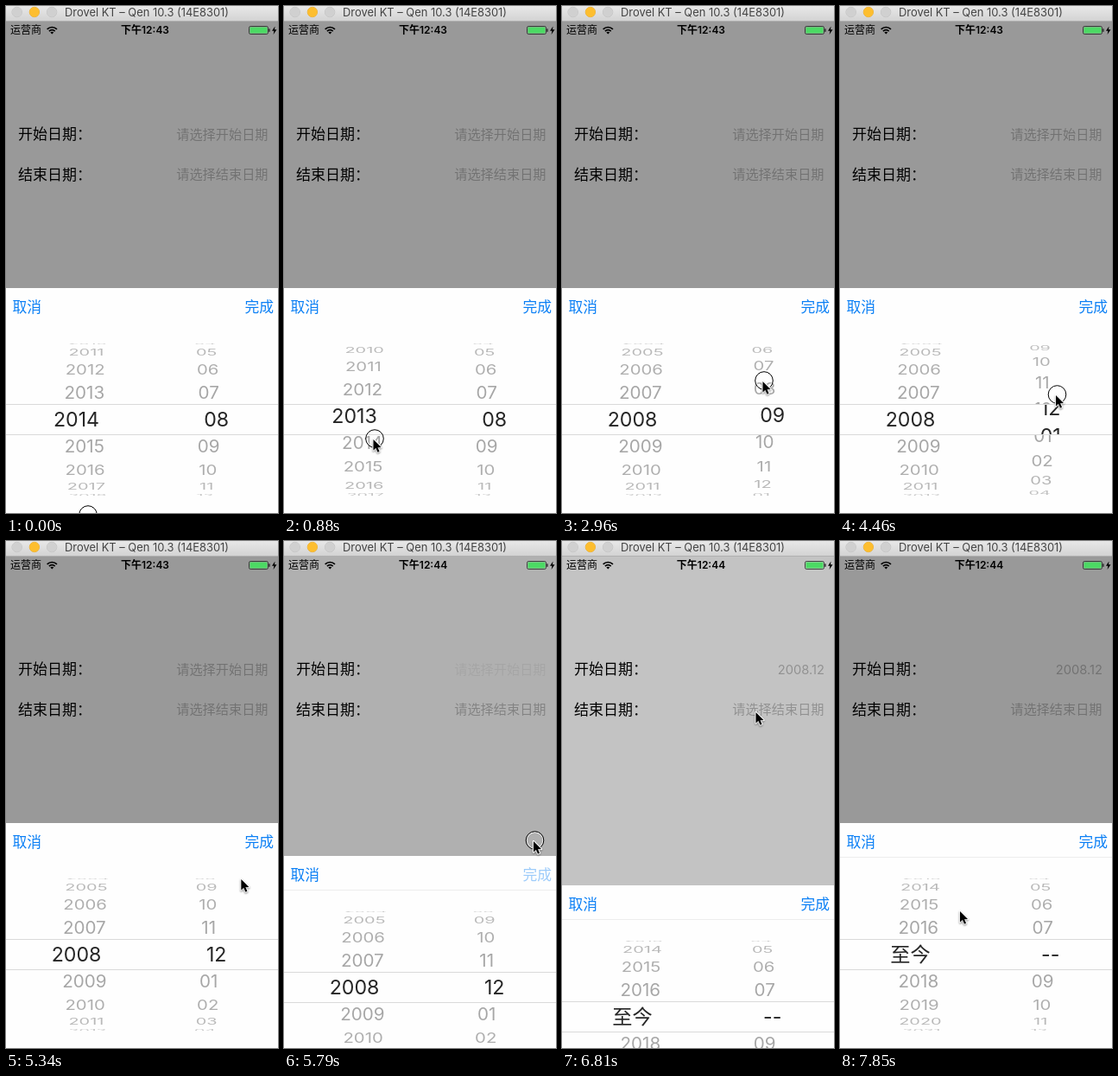
An HTML page with a canvas that plays this animation: 315x586 px, repeating every 8000 ms.

```html
<!DOCTYPE html>
<html lang="zh-CN">
<head>
<meta charset="utf-8">
<style>
html, body { margin: 0; width: 100%; height: 100%; overflow: hidden; background: #999; }
canvas { display: block; width: 315px; height: 586px; }
</style>
</head>
<body>
<canvas id="stage"></canvas>
<script>
const W = 315, H = 586, LOOP = 8000, STEP = 147.5;
const canvas = document.getElementById('stage');
const ctx = canvas.getContext('2d');
const dpr = window.devicePixelRatio || 1;
canvas.width = W * dpr;
canvas.height = H * dpr;

const FONT = "Inter, 'Noto Sans CJK SC', 'Noto Sans CJK', sans-serif";
const BLUE = '#0a7ff5', HINT = '#bebebe';
const SHEET_H = 260, CENTER = 152.2, RADIUS = 89, ROW_ANGLE = 0.355, ROW_DRAG = 35;
const CLOSE_AT = 5678, OPEN_AT = 6591, SLIDE = 300;

const drag = (wheel, x, from, to, start, end, release) => ({ wheel, x, from, to, start, end, release });
const hold = (x, y, start, release) => drag('', x, y, y, start, release, release);

// The pointer glides from each gesture to the next; drags turn a wheel.
const gestures = [
  hold(95, 588, 0, 140),
  drag('year', 105, 470, 575, 560, 1180, 1200),
  drag('year', 107, 427.5, 538, 1330, 1770, 2300),
  drag('month', 234, 474, 392, 2550, 3350, 3720),
  drag('month', 251.5, 533, 449, 4180, 4420, 4900),
  hold(290.5, 346, 5650, 5850),
  hold(226, 197, 6430, 6560),
  hold(226, 197, 7120, 7120),
  hold(140.5, 427, 7800, 7800)
];

const clamp = v => Math.min(1, Math.max(0, v));
const ease = p => (1 - Math.cos(Math.PI * clamp(p))) / 2;
const mix = (a, b, p) => a + (b - a) * p;
const dragY = (g, t) => mix(g.from, g.to, clamp((t - g.start) / (g.end - g.start || 1)));

function wheelPosition(wheel, pos, t) {
  for (const g of gestures) {
    if (g.wheel !== wheel || t < g.start) continue;
    pos += (g.from - dragY(g, t)) / ROW_DRAG;
    pos = mix(pos, Math.round(pos), ease((t - g.release) / 140));
  }
  return pos;
}

function pointerAt(t) {
  const index = gestures.filter(g => g.start <= t).length - 1;
  const now = gestures[index], next = gestures[index + 1] || now;
  const p = ease((t - now.release) / (next.start - now.release || 1));
  return {
    x: mix(now.x, next.x, p),
    y: t <= now.release ? dragY(now, t) : mix(now.to, next.from, p),
    pressed: t < now.release
  };
}

function rect(x, y, w, h, color) {
  ctx.fillStyle = color;
  ctx.fillRect(x, y, w, h);
}

function text(str, x, y, size, color = '#000', align = 'left', weight = 400) {
  ctx.font = `${weight} ${size}px ${FONT}`;
  ctx.textAlign = align;
  ctx.textBaseline = 'middle';
  ctx.fillStyle = color;
  ctx.fillText(str, x, y + 0.8);
}

function polygon(points, fill, outline = 0) {
  ctx.beginPath();
  points.forEach(([x, y]) => ctx.lineTo(x, y));
  ctx.closePath();
  ctx.fillStyle = ctx.strokeStyle = fill;
  ctx.lineJoin = 'round';
  ctx.lineWidth = outline;
  if (outline) ctx.stroke();
  ctx.fill();
}

function ring(x, y, r, color, width, from = 0, to = 2 * Math.PI) {
  ctx.beginPath();
  ctx.arc(x, y, r, from, to);
  ctx.strokeStyle = color;
  ctx.lineWidth = width;
  ctx.stroke();
}

function drawTitleBar() {
  const shade = ctx.createLinearGradient(0, 0, 0, 17);
  shade.addColorStop(0, '#e8e8e8');
  shade.addColorStop(1, '#d3d3d3');
  rect(0, 0, W, 17, shade);
  rect(0, 17, W, 1, '#b0b0b0');
  ['#d0d0d0', '#fdbe2f', '#d0d0d0'].forEach((fill, i) => {
    ring(12.7 + 20.2 * i, 7, 5.7, i === 1 ? '#e0a32a' : '#b9b9b9', 0.8);
    ctx.fillStyle = fill;
    ctx.fill();
  });
  text('Drovel KT – Qen 10.3 (14E8301)', 68, 7.2, 12.9, '#444');
}

function drawStatusBar(t) {
  text('运营商', 5, 28, 12);
  for (const r of [1.4, 4.8, 8]) {
    ring(53.3, 32.5, r, '#000', r < 2 ? 2.8 : 1.7, -Math.PI * 0.75, -Math.PI * 0.25);
  }
  text(t < CLOSE_AT ? '下午12:43' : '下午12:44', 161, 28, 12, '#000', 'center', 600);

  ctx.beginPath();
  ctx.roundRect(281.5, 23.5, 22, 9, 1.8);
  ctx.strokeStyle = '#222';
  ctx.lineWidth = 0.8;
  ctx.stroke();
  rect(282.5, 24.5, 20, 7, '#4cd964');
  rect(304.3, 26.3, 1.3, 3.5, '#222');
  polygon([[311.5, 23.5], [308, 28.8], [310.4, 28.8], [309.6, 33], [313.5, 27.3], [311, 27.3]], '#000');
}

function drawForm(t) {
  text('开始日期：', 14, 148, 17);
  text('结束日期：', 14, 194.7, 17);
  if (t < CLOSE_AT + STEP) {
    ctx.globalAlpha = t < CLOSE_AT ? 1 : 0.25;
    text('请选择开始日期', 303.5, 148.7, 15.2, HINT, 'right');
    ctx.globalAlpha = 1;
  } else {
    text('2008.12', 304, 148.7, 14.7, HINT, 'right');
  }
  text('请选择结束日期', 303.5, 195, 15.2, HINT, 'right');
}

function drawWheel(pos, label, outerX, innerX, inside) {
  const base = Math.round(pos);
  for (let i = base - 5; i <= base + 5; i++) {
    const angle = (i - pos) * ROW_ANGLE;
    if (Math.abs(angle) > 1.5) continue;
    const depth = Math.cos(angle);
    const scale = 1 - 0.07 * (1 - depth);
    ctx.save();
    ctx.translate(inside ? innerX : mix(W / 2, outerX, scale), CENTER + RADIUS * Math.sin(angle));
    ctx.scale(inside ? 1 : scale, depth);
    if (!inside) ctx.globalAlpha = 0.55 + 0.45 * depth;
    text(label(i, inside), 0, 0, inside ? 23.2 : 20.7, inside ? '#262626' : '#a4a4a4', 'center');
    ctx.restore();
  }
}

function clipped(bands, paint) {
  ctx.save();
  ctx.beginPath();
  bands.forEach(([y, h]) => ctx.rect(0, y, W, h));
  ctx.clip();
  paint();
  ctx.restore();
}

function drawSheet(top, t, second) {
  const year = second ? 2017 : wheelPosition('year', 2014, t);
  const month = second ? 8 : wheelPosition('month', 8, t);
  const yearLabel = (i, inside) => second && inside ? '至今' : String(i);
  const monthLabel = (i, inside) => second && inside ? '--' : String((i + 11) % 12 + 1).padStart(2, '0');
  const wheels = inside => () => {
    drawWheel(year, yearLabel, 90.5, 81.5, inside);
    drawWheel(month, monthLabel, 235, 243.7, inside);
  };

  ctx.save();
  ctx.translate(0, top);
  rect(0, 0, W, SHEET_H, '#fefefe');
  if (t > CLOSE_AT) rect(0, 39, W, 1, '#ededed');
  text('取消', 7.5, 22, 16.8, BLUE);
  ctx.globalAlpha = t > CLOSE_AT && !second ? 0.4 : 1;
  text('完成', 310, 22, 16.8, BLUE, 'right', 500);
  ctx.globalAlpha = 1;
  clipped([[64, 70], [170, 70]], wheels(false));
  clipped([[135, 34]], wheels(true));
  rect(0, 134, W, 1, '#dadada');
  rect(0, 169, W, 1, '#dadada');
  ctx.restore();
}

function drawPointer(t) {
  const { x, y, pressed } = pointerAt(t);
  if (pressed) {
    ring(x, y, 9.4, 'rgba(255,255,255,.8)', 1.2);
    ring(x, y, 10.3, '#000', 1);
  }
  const arrow = [[0, 0], [0, 12.5], [2.9, 9.8], [5, 14.6], [7, 13.7], [5, 9.1], [9, 9]];
  ctx.save();
  ctx.translate(x - 1.5, y + 1);
  ctx.shadowColor = 'rgba(0,0,0,.35)';
  ctx.shadowBlur = 2 * dpr;
  ctx.shadowOffsetY = dpr;
  polygon(arrow, '#fff', 2.4);
  ctx.shadowColor = 'transparent';
  polygon(arrow, '#000');
  ctx.restore();
}

function draw(elapsed) {
  const t = Math.floor(elapsed % LOOP / STEP) * STEP;
  const second = t > 6300;
  const shown = second ? ease((t - OPEN_AT) / SLIDE) : 1 - ease((t - CLOSE_AT) / SLIDE);

  ctx.setTransform(dpr, 0, 0, dpr, 0, 0);
  rect(0, 0, W, H, '#fff');
  drawForm(t);
  rect(0, 18, W, H, `rgba(0,0,0,${0.4 * shown ** 1.65})`);
  drawStatusBar(t);
  drawTitleBar();
  if (shown > 0) drawSheet(Math.round(H - SHEET_H * shown), t, second);
  drawPointer(t);
}

const start = performance.now();
function tick() {
  draw(performance.now() - start);
  requestAnimationFrame(tick);
}
tick();
</script>
</body>
</html>
```
